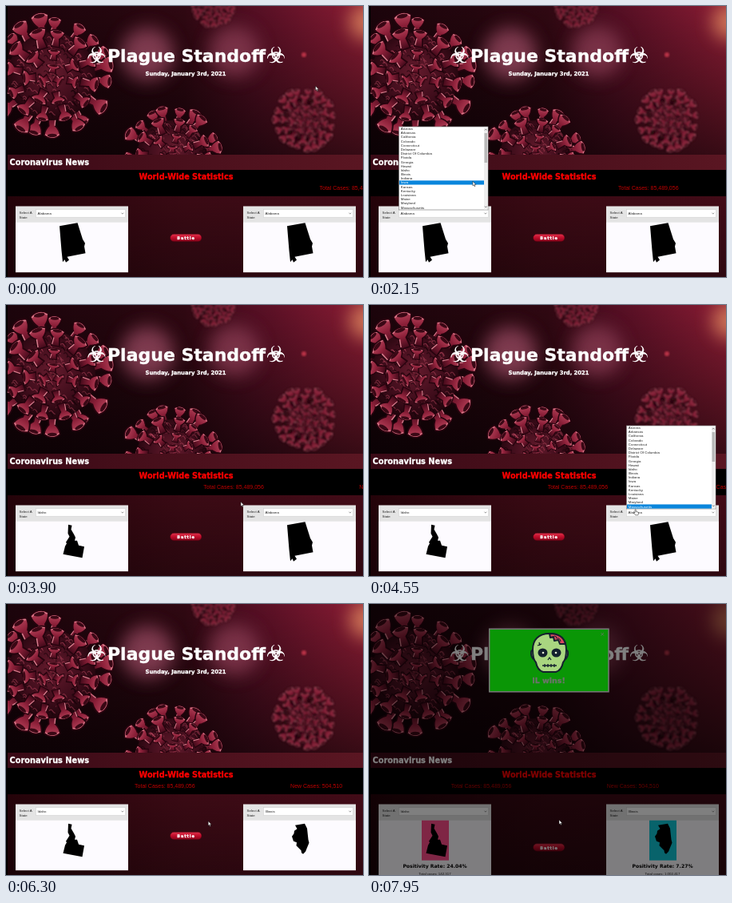
These frames come from a looping animation (447x339 px, 8000 ms). An HTML page:

```html
<!DOCTYPE html>
<html lang="en">
<head>
<meta charset="utf-8">
<title>State battle</title>
<style>
html, body { margin: 0; width: 100%; height: 100%; overflow: hidden; background: #000; }
svg { display: block; width: 100%; height: 100%; }
text { font-family: 'Liberation Sans', sans-serif; white-space: pre; }
.heavy { font-family: 'DejaVu Sans', sans-serif; font-weight: bold; stroke-width: .3px; }
.mid { text-anchor: middle; }
.white { fill: #fff; stroke: #fff; }
.small { font-size: 4.4px; fill: #222; }
</style>
</head>
<body>
<script>
const LOOP = 8000;
const STATES = ['Arizona', 'Arkansas', 'California', 'Colorado', 'Connecticut', 'Delaware',
  'District Of Columbia', 'Florida', 'Georgia', 'Hawaii', 'Idaho', 'Illinois', 'Indiana', 'Iowa',
  'Kansas', 'Kentucky', 'Louisiana', 'Maine', 'Maryland', 'Massachusetts'];
const ROW = 5.18, LIST_TOP = 151;

// Silhouettes are drawn relative to the top left corner of a card.
const SHAPES = {
  Alabama: 'M55 24.500L77.500 20.500 84 41 87 46 86 50 87.500 58.500 64.500 63 67 67 63 70 61.500 66.500 59 69.500 57.500 55Z',
  Idaho: 'M66 24L70.500 25 69.500 30 73 36 75 40 74 44 77 44 79 50 86 51.500 83.500 65.500 59.500 61 62 51 64 47.500 63 46 67.500 39 65.500 35Z',
  Illinois: 'M65 26L77 24 80 30 81.500 44 82.500 48 80 54 78 59 75 62 73 60.500 72.500 57.500 66.500 51.500 67 47.500 63 46 61 40 63.500 36.500 64 33 67.500 30.500Z'
};

let seed = 7;
const random = () => (seed = seed * 16807 % 2147483647) / 2147483647;

// A trumpet-shaped spike pointing away from the centre; flat squeezes it as it turns to the viewer.
const spike = (angle, distance, scale, flat) => `<g transform="rotate(${angle}) translate(0 ${-distance}) scale(${scale} ${scale * flat})">
  <path d="M-4 5L-3-6Q-7-10-7.500-15Q0-21 7.500-15Q7-10 3-6L4 5Z" fill="url(#spike)" stroke="#26040e" stroke-width="1.300"/>
  <path d="M-6.500-14Q0-19 6.500-14M-3.500 3L-2.500-6" fill="none" stroke="#d87c8c" stroke-width="1"/>
  <ellipse cy="-15" rx="4.500" ry="${3.2 - flat * 1.5}" fill="#3a0815"/></g>`;

function virus(cx, cy, r, scale, attrs = '') {
  let out = `<g transform="translate(${cx} ${cy})" ${attrs}>`;
  const ring = (count, distance, flat) => {
    for (let i = 0; i < count; i++) {
      out += spike(i * 360 / count + random() * 13, r * distance, scale * (.85 + random() * .35), flat);
    }
  };
  ring(19, .98, 1);
  out += `<circle r="${r}" fill="url(#ball)"/>`;
  for (let i = 0; i < 150; i++) {
    const a = random() * 6.283, d = Math.sqrt(random()) * r * .93;
    out += `<path d="M${(Math.cos(a) * d).toFixed(1)} ${(Math.sin(a) * d).toFixed(1)}q2-3 4 0t${(random() * 4).toFixed(1)} 3"
      fill="none" stroke="${random() < .55 ? '#b8465e' : '#100106'}" stroke-width="1.200" opacity=".5"/>`;
  }
  ring(12, .76, .75);
  ring(7, .42, .55);
  ring(3, .12, .4);
  return out + '</g>';
}

const glow = (x, y, r, color, opacity) =>
  `<circle cx="${x}" cy="${y}" r="${r}" fill="${color}" opacity="${opacity}" filter="url(#haze)"/>`;

const card = (x, id) => `<g id="${id}" transform="translate(${x} 250.700)">
  <rect class="panel" width="141" height="82.500" fill="#fdfbff"/>
  <rect width="141" height="20" fill="#e4e4e4"/>
  <text class="small" x="4.500" y="9">Select A</text><text class="small" x="4.500" y="15.300">State</text>
  <rect x="25.500" y="4" width="112" height="9.500" fill="#fff" stroke="#ccc" stroke-width=".5"/>
  <text class="small choice" x="27.500" y="10.500"></text>
  <path d="M132.500 8l1.300 1.500 1.300-1.500" fill="none" stroke="#555" stroke-width=".6"/>
  <rect class="result" x="54" y="20" width="34" height="50" fill="${id == 'left' ? '#ff4c8c' : '#10c8d8'}"/>
  <path class="shape"/>
  <g class="result"><text class="heavy mid" x="70.500" y="79.500" font-size="6.100">Positivity Rate: ${id == 'left' ? '24.04%' : '7.27%'}</text>
  <text class="small mid" x="70.500" y="88.500">Total cases: ${id == 'left' ? '142,317' : '1,002,417'}</text></g></g>`;

const list = (x, id) => `<g id="${id}" transform="translate(${x} ${LIST_TOP})">
  <rect width="111.500" height="104" fill="#fff" stroke="#888" stroke-width=".7"/>
  <rect class="bar" x=".5" width="106" height="${ROW}" fill="#0a86dc"/>
  ${STATES.map((name, i) => `<text class="small row" x="2.300" y="${i * ROW + 4.1}">${name}</text>`).join('')}
  <rect x="106.500" y=".5" width="4.600" height="103" fill="#eee"/>
  <rect x="107" y="8" width="3.600" height="37" fill="#b9b9b9"/>
  <path d="M107.500 4.500l1.300-1.500 1.300 1.500M107.500 99.500l1.300 1.500 1.300-1.500" fill="none" stroke="#555" stroke-width=".7"/></g>`;

const zombie = `<g stroke="#14202e" stroke-width="2" stroke-linejoin="round">
  <path d="M207 57q-5 0-4 6t6 7M245 57q5 0 4 6t-6 7" fill="#7fb65a"/>
  <path d="M226 37C212 37 205 45 205 57Q205 69 209 73Q211 83 218 85H234Q241 83 243 73Q247 69 247 57C247 45 240 37 226 37Z" fill="#a9d680"/>
  <path d="M226 37l1 5 4-1 1 5 5-1 2 5 7 0C244 42 237 37 226 37Z" fill="#d8485e"/>
  <path d="M232 40q3 0 3 3 4-1 5 4" fill="none" stroke-width="1"/>
  <ellipse cx="217.500" cy="61" rx="5" ry="4.500" fill="#14202e"/><ellipse cx="234.500" cy="61" rx="5" ry="4.500" fill="#14202e"/>
  <path d="M224 70l2-3 2 3M217 77H235M220 75v4M224 75v4M228 75v4M232 75v4M211 52l5-2M213 48l1 4" fill="none" stroke-width="1.300"/></g>
  <circle cx="218" cy="61" r="1.300" fill="#e8f0d8"/><circle cx="234" cy="61" r="1.300" fill="#e8f0d8"/>`;

document.body.innerHTML = `<svg viewBox="0 0 447 339" preserveAspectRatio="none">
<defs>
  <linearGradient id="page"><stop stop-color="#240309"/><stop offset=".5" stop-color="#3a0a14"/><stop offset="1" stop-color="#420b17"/></linearGradient>
  <linearGradient id="news"><stop stop-color="#3a0a16"/><stop offset="1" stop-color="#5a1622"/></linearGradient>
  <linearGradient id="shade" x2="0" y2="1"><stop stop-opacity="0"/><stop offset="1" stop-opacity=".3"/></linearGradient>
  <linearGradient id="sky"><stop stop-color="#1c040b"/><stop offset=".3" stop-color="#25060e"/><stop offset=".5" stop-color="#300812"/><stop offset=".7" stop-color="#560f24"/><stop offset="1" stop-color="#8a1c34"/></linearGradient>
  <linearGradient id="dusk" x2="0" y2="1"><stop stop-opacity="0"/><stop offset="1" stop-opacity=".6"/></linearGradient>
  <linearGradient id="spike" x2="0" y2="1"><stop stop-color="#b8455c"/><stop offset=".45" stop-color="#8c2039"/><stop offset="1" stop-color="#420a1a"/></linearGradient>
  <radialGradient id="ball" cx=".5" cy=".45" r=".6"><stop stop-color="#651b2d"/><stop offset=".6" stop-color="#3d0c1a"/><stop offset="1" stop-color="#180308"/></radialGradient>
  <linearGradient id="pill" x2="0" y2="1"><stop stop-color="#e0324c"/><stop offset=".5" stop-color="#bf0c2a"/><stop offset="1" stop-color="#83041a"/></linearGradient>
  <clipPath id="hero"><path d="M2 0H447V186H2Z"/></clipPath>
  <filter id="soft"><feGaussianBlur stdDeviation="1.100"/></filter>
  <filter id="haze" x="-1" y="-1" width="3" height="3"><feGaussianBlur stdDeviation="11"/></filter>
</defs>
<rect width="447" height="339" fill="url(#page)"/>
<rect y="238" width="447" height="101" fill="url(#shade)"/>
<g clip-path="url(#hero)">
  <rect width="447" height="186" fill="url(#sky)"/>
  <rect width="447" height="186" fill="url(#dusk)"/>
  ${glow(452, 20, 22, '#e08a60', .8)}
  ${glow(177, 60, 33, '#94475f', .8)}
  ${glow(286, 57, 32, '#8c3c55', .75)}
  ${virus(260, 0, 17, .6, 'filter="url(#soft)" opacity=".7"')}
  ${virus(374, 142, 28, .72, 'filter="url(#soft)" opacity=".8"')}
  <circle cx="373" cy="61" r="3" fill="#d03a50" opacity=".8" filter="url(#soft)"/>
  ${virus(208, 187, 44, 1.05)}
  ${virus(57, 88, 55, 1.3)}
</g>
<rect y="186" width="447" height="19" fill="url(#news)"/>
<rect y="205" width="447" height="33"/>
<rect width="2" height="339"/>
<g class="white" font-size="27" stroke-width=".6">
  <text class="mid" style="font-family:'DejaVu Sans',sans-serif" x="113.500" y="71">☣</text>
  <text class="mid" style="font-family:'DejaVu Sans',sans-serif" x="338" y="71">☣</text>
</g>
<text class="heavy mid white" x="226" y="69.500" font-size="22">Plague Standoff</text>
<text class="heavy mid white" x="225" y="86.500" font-size="6.800">Sunday, January 3rd, 2021</text>
<text class="heavy white" x="4.500" y="198.500" font-size="9.800">Coronavirus News</text>
<text class="heavy mid" x="225.500" y="217" font-size="9.700" fill="#f00" stroke="#f00">World-Wide Statistics</text>
<g id="ticker" font-size="7" fill="#c00000"><text y="230.300">Total Cases: 85,489,056</text><text x="195" y="230.300">New Cases: 504,510</text></g>
${card(12, 'left')}${card(297, 'right')}
<g id="button">
  <rect id="pillShape" x="205.500" y="-4.700" width="39.500" height="9.400" fill="url(#pill)"/>
  <text class="heavy mid white" x="225.500" y="2" font-size="5" letter-spacing=".9">Battle</text>
</g>
${list(37.5, 'leftList')}${list(322.5, 'rightList')}
<rect id="backdrop" width="447" height="339"/>
<g id="modal">
  <rect x="150.700" y="31.200" width="149.300" height="78.600" fill="#0a9606" stroke="#777" stroke-width="1.500"/>
  ${zombie}
  <text class="heavy mid" x="225" y="98.500" font-size="9.500" fill="#6c756a" stroke="#6c756a">IL wins!</text>
  <path d="M290.500 36l3.500 3.500m0-3.500l-3.500 3.500" stroke="#5c7a58" stroke-width=".9"/>
</g>
<g id="cursor" stroke="#111" stroke-width=".5" fill="#fff">
  <path id="arrow" d="M0 0V5.600L1.300 4.500 2.200 6.500 3.100 6.100 2.200 4.200H4Z"/>
  <path id="hand" d="M0 .6Q.7-.3 1.300.6V3L4 3.500Q4.700 4 4.400 6L3.800 7.300H.7L-1.500 4.500Q-1.200 3.600 0 4.300Z"/>
</g>
</svg>`;

const get = id => document.getElementById(id);
const show = (el, on) => el.setAttribute('visibility', on ? 'visible' : 'hidden');
const place = (el, x, y) => el.setAttribute('transform', `translate(${x} ${y})`);
const clamp = (v, lo = 0, hi = 1) => Math.min(hi, Math.max(lo, v));
const linear = p => p;
const smooth = p => p * p * (3 - 2 * p);

// Each key is [time, ...values].
function track(keys, t, ease) {
  const next = keys.findIndex(key => key[0] > t);
  if (next < 0) return keys[keys.length - 1].slice(1);
  const a = keys[next - 1], b = keys[next];
  const p = ease((t - a[0]) / (b[0] - a[0]));
  return a.slice(1).map((v, i) => v + (b[i + 1] - v) * p);
}

const TICKER = [[0, 392.5], [3100, 276.5], [5500, 189], [7150, 131.5], [8000, 101]];
const POINTER = [[0, 387.5, 100], [1000, 141, 257], [1450, 141, 257],
  [2500, 126, 206], [3250, 126, 206], [4150, 333, 255.5], [4600, 333, 255.5], [5200, 339, 209.5],
  [5550, 339, 209.5], [6600, 232, 287], [7300, 232, 287], [7950, 238, 270]];

function updateCard(id, state, battled) {
  const el = get(id);
  el.querySelector('.choice').textContent = state;
  el.querySelector('.shape').setAttribute('d', SHAPES[state]);
  el.querySelector('.panel').setAttribute('height', battled ? 100 : 82.5);
  el.querySelectorAll('.result').forEach(part => show(part, battled));
}

function updateList(id, open, pointerY) {
  const el = get(id);
  show(el, open);
  if (!open) return;
  const hover = clamp(Math.floor((pointerY - LIST_TOP) / ROW), 0, STATES.length - 1);
  el.querySelector('.bar').setAttribute('y', hover * ROW);
  el.querySelectorAll('.row').forEach((row, i) => row.style.fill = i == hover ? '#fff' : '');
}

function draw(t) {
  const [x, y] = track(POINTER, t, smooth);
  const battled = t >= 7300;
  place(get('ticker'), track(TICKER, t, linear)[0], 0);

  updateCard('left', t < 3250 ? 'Alabama' : 'Idaho', battled);
  updateCard('right', t < 5400 ? 'Alabama' : 'Illinois', battled);
  updateList('leftList', t >= 1300 && t < 3250, y);
  updateList('rightList', t >= 4300 && t < 5400, y);

  const pressed = t >= 7050 && !battled;
  const pill = get('pillShape');
  place(get('button'), 0, battled ? 304.5 : 290);
  pill.setAttribute('rx', pressed ? 0 : 4.7);
  pill.setAttribute('stroke', pressed ? '#b0848a' : '#4a0410');
  pill.setAttribute('stroke-width', pressed ? .9 : .6);

  const fade = clamp((t - 7300) / 150), slide = clamp((t - 7300) / 300);
  get('backdrop').setAttribute('opacity', fade * .5);
  get('modal').setAttribute('opacity', fade);
  place(get('modal'), 0, -12 * (1 - slide) ** 2);

  const overSelect = y > 255 && (x > 37 && x < 150 || x > 322 && x < 434);
  const hand = !battled && (overSelect || y > 285);
  place(get('cursor'), x, y);
  show(get('arrow'), !hand);
  show(get('hand'), hand);
}

const start = performance.now();
function frame() {
  const t = (performance.now() - start) % LOOP;
  draw(Math.floor(t / 50) * 50);
  requestAnimationFrame(frame);
}
frame();
</script>
</body>
</html>
```
